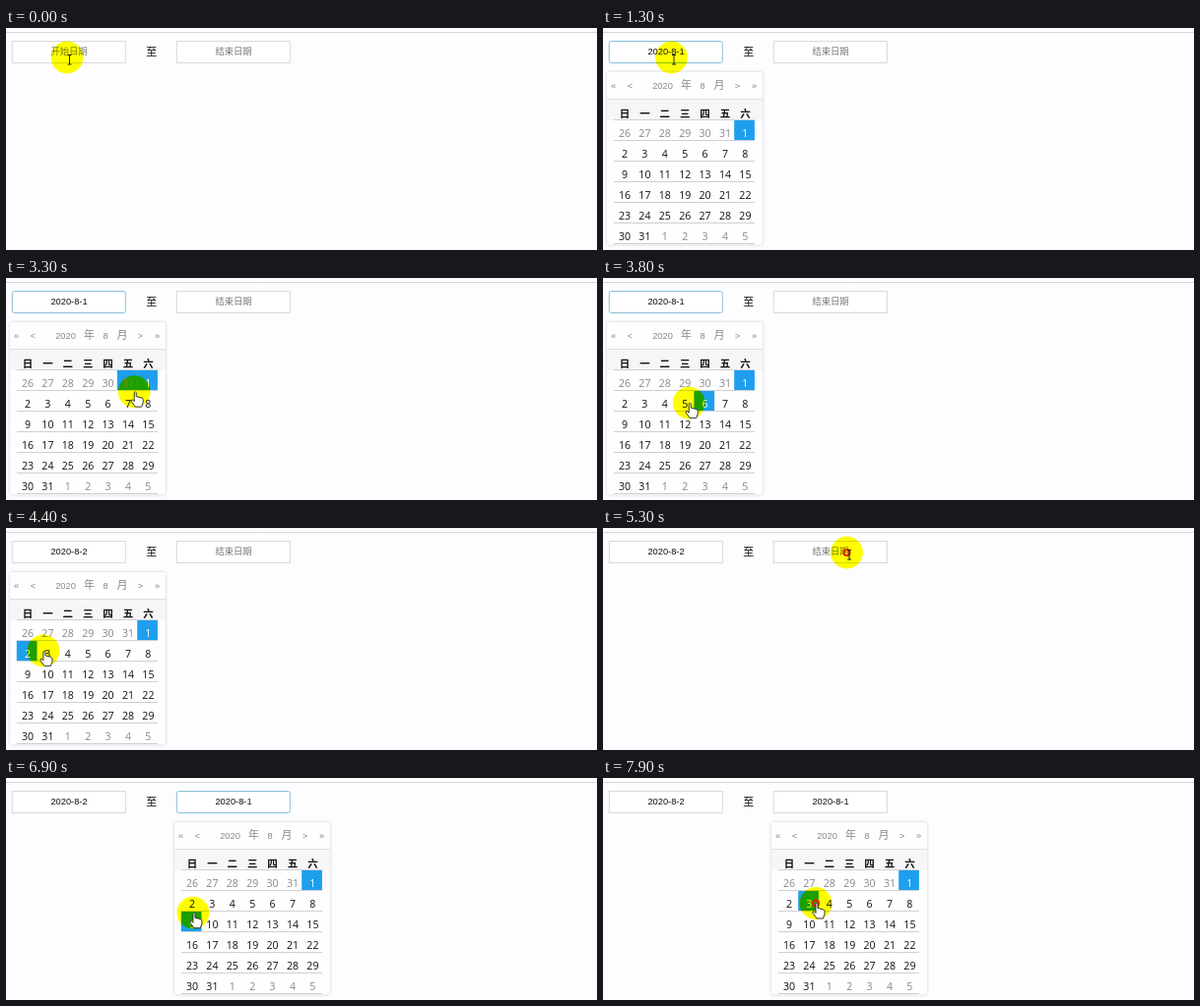
Write an HTML page that moves like this. It is 600 px wide and 226 px high and loops after 8 s.

```html
<!DOCTYPE html>
<html lang="zh">
<head>
<meta charset="utf-8">
<style>
  html, body { margin: 0; width: 100%; height: 100%; overflow: hidden; background: #fdfcfe; }
  svg { display: block; }
  text { text-anchor: middle; font: 9.3px "Liberation Sans", "Noto Sans CJK SC", sans-serif; fill: #111; }
  .day { font: 10.6px "Open Sans", "Noto Sans", sans-serif; }
  .week { font: bold 10.5px "Noto Sans CJK SC", sans-serif; }
  .cjk { font-size: 11px; }
  .muted { fill: #888; }
  .hint { fill: #777; }
  .lit { fill: #fff; }
  .box { fill: #fff; stroke: #d9d9de; }
  .box.focus { stroke: #86bfd9; }
  .panel { fill: #fefdff; filter: drop-shadow(0 0 1.6px #0003); }
  .mark { fill: #1e9fee; }
  .spot { fill: #ff0; mix-blend-mode: multiply; }
  .cursor { fill: #fff; stroke: #222; stroke-width: .9; stroke-linejoin: round; }
</style>
</head>
<body>
<svg id="stage" width="600" height="226" viewBox="0 0 600 226"></svg>
<script>
const LOOP = 8000, STEP = 100, SHIFT = 167;
const GRID = { x: 11.8, y: 94, w: 20.4, h: 21 };
const stage = document.getElementById('stage');

// Pointer moves, each eased from wherever the previous one ended
const start = { x: 62, y: 30 };
const moves = [
  { from: 0, to: 200, x: 69.5, y: 30 },
  { from: 2600, to: 3500, x: 139, y: 128 },
  { from: 3500, to: 4150, x: 22, y: 126 },
  { from: 4200, to: 4500, x: 43.5, y: 124.5 },
  { from: 4500, to: 5100, x: 247.5, y: 25 },
  { from: 5500, to: 6100, x: 221, y: 149 },
  { from: 6100, to: 6500, x: 189.5, y: 160 },
  { from: 6600, to: 7000, x: 190, y: 133 },
  { from: 7100, to: 7500, x: 216, y: 127.5 }
];

function pointerAt(t) {
  let { x, y } = start;
  for (const m of moves) {
    const u = Math.min(1, Math.max(0, (t - m.from) / (m.to - m.from)));
    const k = u * u * (3 - 2 * u);
    x += (m.x - x) * k;
    y += (m.y - y) * k;
  }
  return { x, y };
}

function add(parent, tag, attrs = {}, content = '') {
  const el = document.createElementNS('http://www.w3.org/2000/svg', tag);
  for (const name in attrs) el.setAttribute(name, attrs[name]);
  el.textContent = content;
  return parent.appendChild(el);
}
const label = (parent, x, y, content, cls = '') => add(parent, 'text', { x, y, class: cls }, content);
const show = (el, on) => { el.style.display = on ? '' : 'none'; };

function makeInput(x, hint) {
  const box = add(stage, 'rect', { x: x + .3, y: 13.5, width: 115, height: 22, class: 'box' });
  const text = label(stage, x + 58, 27);
  return (value, focus) => {
    box.classList.toggle('focus', focus);
    box.setAttribute('rx', focus ? 2 : 0);
    text.textContent = value || hint;
    text.classList.toggle('hint', !value);
  };
}

function makeCalendar(dx) {
  const g = add(stage, 'g', { transform: `translate(${dx} 0)` });
  const { x: left, y: top, w, h } = GRID;
  add(g, 'rect', { x: 4, y: 45, width: 158, height: 175.5, rx: 2, class: 'panel' });
  add(g, 'rect', { x: 4, y: 72, width: 158, height: 22, fill: '#f6f5f8' });
  add(g, 'path', { d: 'M4 72.5h158', stroke: '#e0e0e4' });
  const header = { '«': 10.5, '<': 27.5, '2020': 60.5, '年': 84.5, '8': 101, '月': 118, '>': 136.5, '»': 153.5 };
  for (const s in header) label(g, header[s], 62, s, /[年月]/.test(s) ? 'muted cjk' : 'muted');

  const mark = add(g, 'rect', { width: w + .3, height: h - .3, class: 'mark' });
  const place = (el, col, row) => {
    el.setAttribute('x', left + col * w - 1);
    el.setAttribute('y', top + row * h - .6);
  };
  place(g.appendChild(mark.cloneNode()), 6, 0);

  for (let row = 0; row < 7; row++) add(g, 'path', { d: `M11 ${top + row * h - .5}h143`, stroke: '#d0d0d4' });
  const center = col => left + (col + .5) * w;
  [...'日一二三四五六'].forEach((s, col) => label(g, center(col), 91, s, 'week'));
  const days = Array.from({ length: 42 }, (_, i) => {
    const date = new Date(2020, 6, 26 + i);
    const cls = date.getMonth() === 7 ? 'day' : 'day muted';
    return label(g, center(i % 7), 111.3 + Math.floor(i / 7) * h, date.getDate(), cls);
  });

  return (open, { x, y }) => {
    const col = Math.floor((x - dx - left) / w), row = Math.floor((y - top) / h);
    const inside = col >= 0 && col < 7 && row >= 0 && row < 6;
    show(g, open);
    show(mark, inside);
    place(mark, col, row);
    days.forEach((day, i) => {
      const marked = i === 6 || (inside && i === row * 7 + col);
      day.classList.toggle('lit', marked && !day.classList.contains('muted'));
    });
  };
}

add(stage, 'path', { d: 'M0 4.5h600', stroke: '#d6d5d8' });
const setStart = makeInput(6, '开始日期');
const setEnd = makeInput(6 + SHIFT, '结束日期');
label(stage, 147.8, 27.5, '至', 'cjk');
const startCalendar = makeCalendar(0), endCalendar = makeCalendar(SHIFT);

const spot = add(stage, 'circle', { r: 16.4, class: 'spot' });
const pointer = add(stage, 'g');
const ring = add(pointer, 'circle', { r: 3, fill: 'none', stroke: '#e8200c', 'stroke-width': 2 });
const beam = add(pointer, 'path', { d: 'M.5-2.5h4m-2 0v9.5m-2 0h4', stroke: '#222' });
const hand = add(pointer, 'path', { d: 'M0 1Q1-1 2 1V5L8 6.5 9 8V11L7.5 15.5H1L-3 10V8.5H-1.5L0 10Z', class: 'cursor' });
const arrow = add(pointer, 'path', { d: 'M0 0V12L3 9.5 5 13.5 6.5 12.5 4.5 8.7H8Z', class: 'cursor' });

function draw(t) {
  const during = (from, to) => t >= from && t < to;
  const { x, y } = pointerAt(t);
  const hovered = pointerAt(t - STEP); // hover trails the pointer by one step
  const startOpen = during(1100, 4500), endOpen = t >= 5500;

  setStart(t < 1100 ? '' : t < 4400 ? '2020-8-1' : '2020-8-2', during(1100, 4200));
  setEnd(endOpen ? '2020-8-1' : '', during(5500, 7800));
  startCalendar(startOpen, hovered);
  endCalendar(endOpen, hovered);

  for (const el of [spot, pointer]) el.setAttribute('transform', `translate(${x} ${y})`);
  const overInput = y > 13 && y < 36 && (x < 121 || x > 173);
  const overDays = (startOpen || endOpen) && y > GRID.y;
  show(beam, overInput);
  show(hand, overDays);
  show(arrow, !overInput && !overDays);
  show(ring, during(900, 1100) || during(4200, 4300) || during(5300, 5500) || t >= 7800);
}

function frame() {
  draw(Math.floor(performance.now() % LOOP / STEP) * STEP);
  requestAnimationFrame(frame);
}
frame();
</script>
</body>
</html>
```
